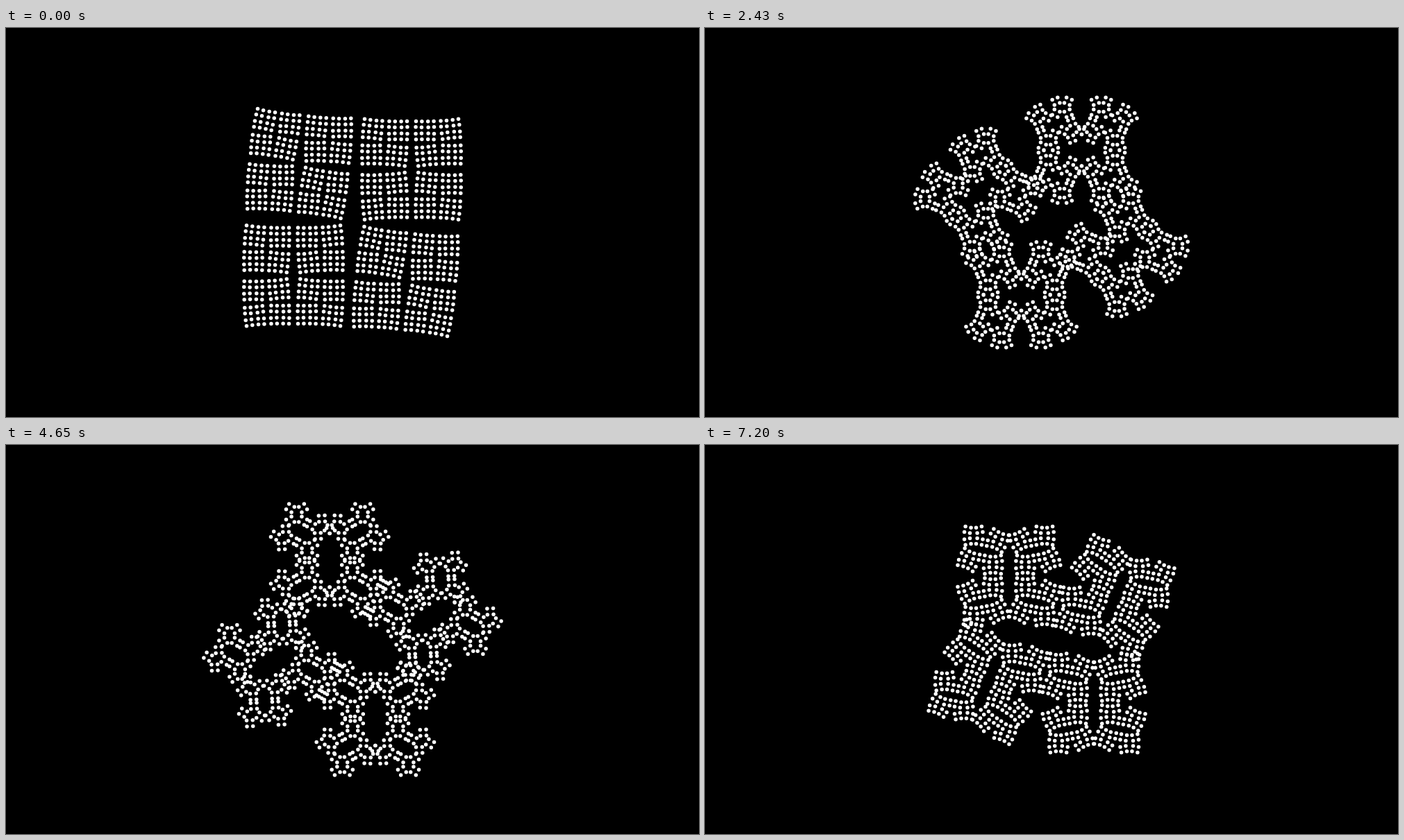
An HTML page with a canvas that plays this animation: 998 px wide and 561 px high, repeating every 7.3 s.

```html
<!DOCTYPE html>
<html lang="en">
<head>
<meta charset="utf-8">
<title>Nested rotating squares</title>
<style>
  html, body { margin: 0; width: 100%; height: 100%; overflow: hidden; background: #000; }
  canvas { display: block; }
</style>
</head>
<body>
<canvas id="stage" width="998" height="561"></canvas>
<script>
const ctx = document.getElementById('stage').getContext('2d');
const LOOP = 7300, STEP = 30, LAST = 240;
const LEVELS = 5, RATIO = 2.095, RADIUS = 2.75;
const CORNERS = [[-1, -1], [1, -1], [-1, 1], [1, 1]];

// Every block turns its four children alternately by +turn and -turn.
function block(x, y, angle, gap, level, turn) {
  if (level === 0) {
    ctx.moveTo(x + RADIUS, y);
    ctx.arc(x, y, RADIUS, 0, 2 * Math.PI);
    return;
  }
  const c = Math.cos(angle) * gap / 2, s = Math.sin(angle) * gap / 2;
  for (const [u, v] of CORNERS) {
    block(x + u * c - v * s, y + u * s + v * c,
      angle + u * v * turn, gap / RATIO, level - 1, turn);
  }
}

function draw(time) {
  const step = Math.min(LAST, Math.floor(time / STEP));
  const turn = 0.051 + step / 30;
  const gap = 162.3 * (1 - 0.041 * Math.sin(turn));
  ctx.fillStyle = '#000';
  ctx.fillRect(0, 0, 998, 561);
  ctx.fillStyle = '#fff';
  ctx.beginPath();
  block(499, 280.5, turn, gap, LEVELS, turn);
  ctx.fill();
}

const start = performance.now();
function tick() {
  draw((performance.now() - start) % LOOP);
  requestAnimationFrame(tick);
}
tick();
</script>
</body>
</html>
```
